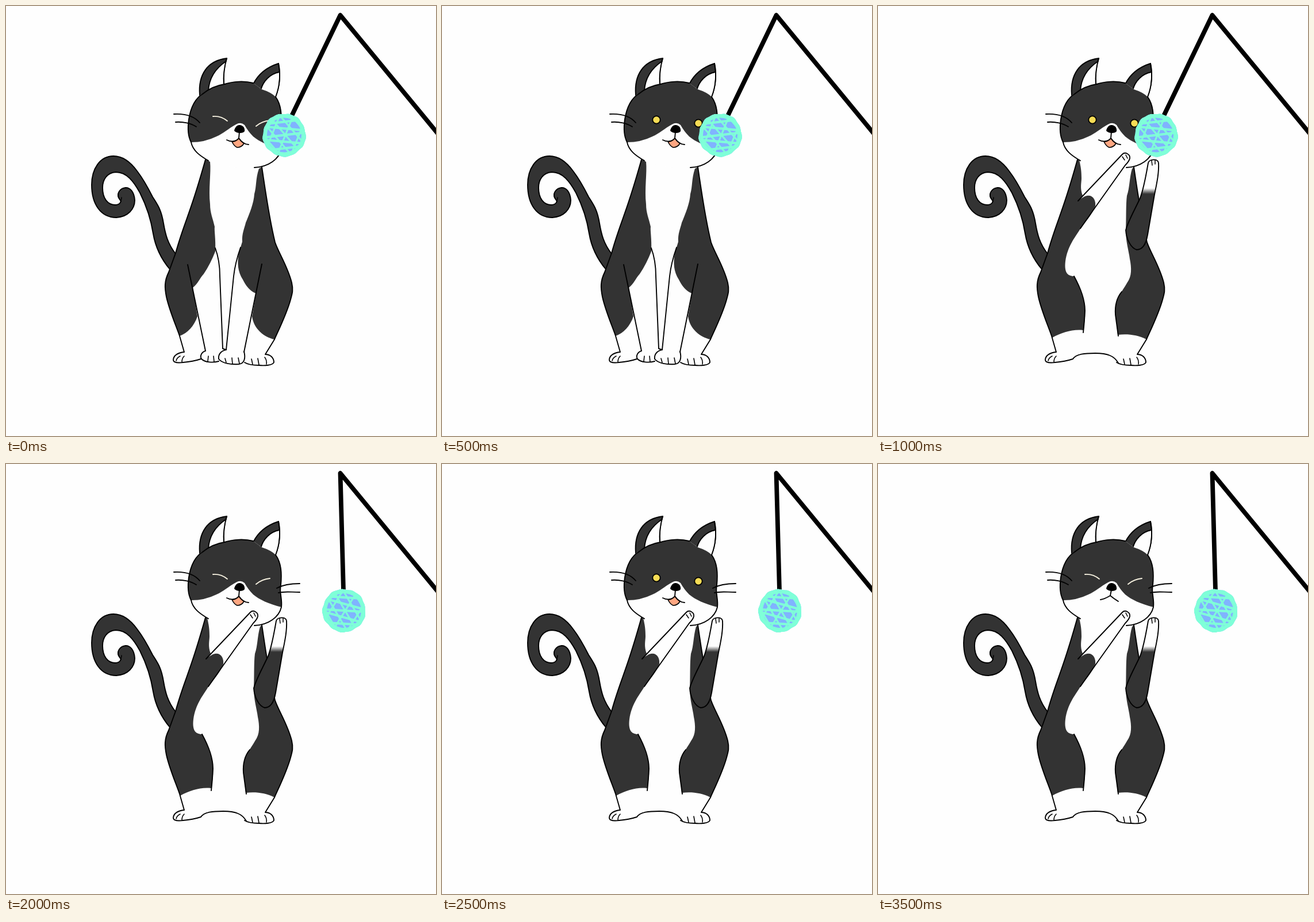
An HTML page with a canvas for the animation above (4 s loop, 748 px wide and 748 px high).

```html
<!DOCTYPE html>
<html lang="en">
<head>
<meta charset="utf-8">
<title>Cat and ball</title>
<style>
html, body { margin: 0; width: 100%; height: 100%; overflow: hidden; background: #fefefe; }
canvas { display: block; }
</style>
</head>
<body>
<canvas id="stage" width="748" height="748"></canvas>
<script>
const ctx = document.getElementById('stage').getContext('2d');
const FUR = '#333', WHITE = '#fefefe', MINT = '#7fffd8', BLUE = '#80b3ff';
const STEP = 500, STEPS = 8;

function fill(d, color) {
  ctx.fillStyle = color;
  ctx.fill(new Path2D(d));
}
function line(d, width = 1.9, color = '#000') {
  ctx.strokeStyle = color;
  ctx.lineWidth = width;
  ctx.stroke(new Path2D(d));
}
function shape(d, color, width) {
  fill(d, color);
  line(d, width);
}

// Outer sides of the body, shared by both poses
const leftSide = 'C338 299 328 332 318 360 C309 386 302 404 295 430 L283 463 C275 479 276 491 279 506 C284 529 295 554 302 574';
const rightSide = 'C450 312 457 366 468 411 C474 429 490 453 497 481 C500 494 498 500 495 511 C488 536 475 562 467 580';
const leftFoot = 'L310 602 C299 603 291 608 291 616 C292 621 300 621 308 620 C320 619 330 617 339 614';
const rightFoot = 'L451 606 C460 606 466 612 466 620 C464 625 450 626 440 625 C430 625 421 624 415 620';

function drawTail() {
  shape(`M295 431 C281 413 277 396 274 378 C270 353 263 345 255 332 C245 312 238 300 228 287
    C217 272 203 261 187 261
    C163 261 149 284 149 311 C149 345 165 368 192 368 C212 367 224 353 224 338
    C223 323 216 316 208 316 C199 317 194 324 195 331 C196 336 199 337 200 340
    C198 345 194 346 190 346 C177 346 168 335 168 316 C168 303 175 290 191 289
    C210 289 222 305 233 325 C243 345 252 370 256 396 C260 420 270 440 285 458`, FUR);
  line('M201 333 Q201 337 199 341', 1.5);
}

function drawOutline(foot = '') {
  line('M347 267' + leftSide + leftFoot + foot);
  line('M445 280' + rightSide + rightFoot);
  line('M303 609 Q297 612 296 617 M310 609 Q306 613 306 619 M427 614 L429 623 M438 613 L440 624 M450 611 Q454 616 453 623', 1.6);
}

function drawSitting() {
  fill('M347 267' + leftSide + 'L310 602 L451 606 L467 580 L498 490 L468 411 L445 280Z', WHITE);
  fill('M347 267' + leftSide + `C316 569 327 557 333 540 L325 490 C334 483 336 475 344 466
    Q356 448 364 427 C365 405 362 390 363 384 C360 370 355 360 355 345 C352 318 357 290 355 271Z`, FUR);
  fill('M445 280' + rightSide + `C449 576 431 562 428 540 L435 500 C424 496 417 486 412 476
    C403 462 402 447 405 430 L411 410 C410 396 415 386 417 377 C424 360 431 343 432 327
    C436 314 434 300 440 283Z`, FUR);
  drawOutline();
  shape('M383 598 C373 600 369 607 370 614 C376 622 392 624 405 623 C415 622 417 612 414 601', WHITE);
  line('M316 450 L347 600 C340 602 337 609 340 614 C346 620 360 621 370 618');
  line('M364 421 C371 440 372 455 372 470 L377 596 L383 598 L396 470 C398 452 401 440 408 420 M445 449 L414 602');
  line('M352 609 L351 618 M361 609 L362 619 M381 613 L383 620 M393 612 L394 623 M404 612 L406 622', 1.6);
}

function drawReaching() {
  fill('M347 267' + leftSide + 'L310 602 L340 613 Q380 596 418 620 L451 606 L467 580 L498 490 L468 411 L445 280Z', WHITE);
  fill('M347 267' + leftSide + `L303 577 C320 568 338 562 357 564 C362 540 361 523 356 507
    Q350 487 341 470 C328 470 324 461 326 444 C330 418 341 405 353 386 C364 371 374 361 379 345
    C378 332 371 327 360 331 L350 337 L356 330 C351 317 354 307 354 300 C354 288 353 280 350 268Z`, FUR);
  fill('M445 280' + rightSide + `C452 572 434 570 417 572 L413 535 C411 510 425 497 433 482
    C442 470 441 455 438 440 C436 425 431 410 431 390 C432 370 431 345 433 330
    C438 316 437 300 442 283Z`, FUR);
  drawOutline('C345 605 360 604 378 604 C400 604 411 609 418 621');
  line('M341 470 C352 490 360 511 360 530 Q359 551 357 568 M424 497 C414 509 412 523 413 537 L418 574');
}

function drawArms() {
  fill('M362 329 L425 258 C430 253 439 258 438 265 Q437 270 430 277 L378 350 Q380 329 362 329Z', WHITE);
  line('M348 339 L425 258 C430 253 439 258 438 265 Q437 270 430 277 L378 350 L352 387');
  line('M425 262 L429 268 M431 259 L434 265', 1.5);
  const sleeve = ctx.createLinearGradient(0, 317, 0, 327);
  sleeve.addColorStop(0, WHITE);
  sleeve.addColorStop(1, FUR);
  shape(`M470 273 C472 266 487 265 488 273 C489 290 485 308 481 328 L469 398
    C466 415 459 424 450 424 C440 421 432 406 431 390 C435 374 448 352 456 334 C463 315 467 290 470 273Z`, sleeve);
  line('M476 269 L477 277 M482 268 L482 275', 1.5);
}

function drawHead() {
  shape('M337 155 C334 120 350 95 384 91 C379 105 378 120 379 138', FUR);
  fill('M352 148 C353 128 362 110 383 97 Q377 116 379 138Z', WHITE);
  line('M352 148 C353 128 362 110 383 96 M384 91 Q377 115 379 138');
  shape('M430 136 C439 118 455 106 474 100 C478 120 476 140 469 158', FUR);
  fill('M443 147 C447 130 460 118 475 115 Q476 140 469 158Z', WHITE);
  line('M443 147 C447 130 460 118 475 115 M474 100 C478 120 476 140 469 158');

  const crown = `M322 237 C315 224 317 204 318 197 C321 178 329 161 342 153 C353 144 367 138 380 136
    C395 131 415 130 430 134 L445 145 Q461 150 469 158 C479 172 480 190 478 211 C475 222 481 235 479 249`;
  const jaw = 'C475 266 457 280 432 281';
  fill(crown + jaw + 'C405 283 380 280 352 269 C338 261 325 252 322 237Z', WHITE);
  fill(crown + `C456 243 441 236 430 227 Q421 218 415 207 Q408 201 400 206
    C387 213 378 222 366 227 Q346 237 322 237Z`, FUR);
  line('M352 269 C338 261 325 252 322 237 C315 224 317 204 318 197 C321 178 329 161 342 153 C353 144 367 138 380 136 C395 131 415 130 430 134');
  line('M469 158 C479 172 480 190 478 211 C475 222 481 235 479 249' + jaw);
  line('M292 188 C310 187 326 190 337 203 M295 202 C308 201 322 204 331 210');
  line('M471 216 C482 210 495 208 511 208 M474 224 C485 221 495 223 511 223');
}

function drawEye(x, y) {
  ctx.beginPath();
  ctx.arc(x, y, 6.7, 0, Math.PI * 2);
  ctx.fillStyle = '#f6dc55';
  ctx.fill();
  ctx.strokeStyle = '#000';
  ctx.lineWidth = 1.8;
  ctx.stroke();
}

function drawFace(eyesOpen, smiling) {
  if (eyesOpen) {
    drawEye(373, 198);
    drawEye(446, 204);
  } else {
    line('M360 192 C371 191 379 195 385 200 M435 209 C443 202 450 200 459 199', 1.9, '#f5f0df');
  }
  if (smiling) {
    shape('M393 236 Q400 236 405 230 Q409 236 414 239 Q410 246 402 246 Q397 244 393 236Z', '#ffa681', 1.6);
    line('M406 219 L405 230 C400 236 392 237 384 233 M405 230 C410 237 416 241 422 241');
  } else {
    line('M406 219 L404 229 C399 232 394 235 387 236 M404 229 Q410 234 418 239');
  }
  fill('M397 217 C398 211 402 207 406 207 C412 207 416 212 415 218 C412 222 401 222 397 217Z', '#000');
}

function drawBall(x, y, tilt) {
  ctx.save();
  ctx.translate(x, y);
  ctx.rotate(tilt);
  ctx.beginPath();
  for (let i = 0; i < 60; i++) {
    const a = i * Math.PI / 30;
    const r = 37.3 + 0.6 * Math.sin(5 * a) + 0.5 * Math.sin(13 * a);
    ctx.lineTo(r * Math.cos(a), r * Math.sin(a));
  }
  ctx.closePath();
  ctx.fillStyle = BLUE;
  ctx.fill();
  ctx.save();
  ctx.clip();
  for (let i = -3; i <= 3; i++) {
    const row = i * 11.5, slant = i % 2 ? 5 : -3;
    line(`M-38 ${row - slant} L38 ${row + slant}`, 4, MINT);
    line(`M${i * 19 - 30} -40 L${i * 19 + 34} 40`, 3, MINT);
    line(`M${i * 24 + 20} -40 L${i * 24 - 16} 40`, 3, MINT);
  }
  ctx.lineWidth = 15;
  ctx.beginPath();
  ctx.arc(0, 0, 37.5, 0, Math.PI * 2);
  ctx.strokeStyle = MINT;
  ctx.stroke();
  ctx.restore();
  ctx.restore();
}

function drawToy(near) {
  line('M752 223 L581.5 16 L' + (near ? '497 191' : '587 220'), 7.8);
  if (near) drawBall(484, 224.5, -0.04);
  else drawBall(588, 255, 0.14);
}

function draw(step) {
  const near = step < 4, sitting = step < 2;
  const eyesOpen = [1, 2, 5, 6].includes(step);
  ctx.fillStyle = WHITE;
  ctx.fillRect(0, 0, 748, 748);
  ctx.lineCap = ctx.lineJoin = 'round';
  drawTail();
  if (sitting) drawSitting();
  else drawReaching();
  drawHead();
  drawFace(eyesOpen, step < 6);
  if (!sitting) drawArms();
  drawToy(near);
}

const start = performance.now();
function tick() {
  draw(Math.floor((performance.now() - start) / STEP) % STEPS);
  requestAnimationFrame(tick);
}
tick();
</script>
</body>
</html>
```
